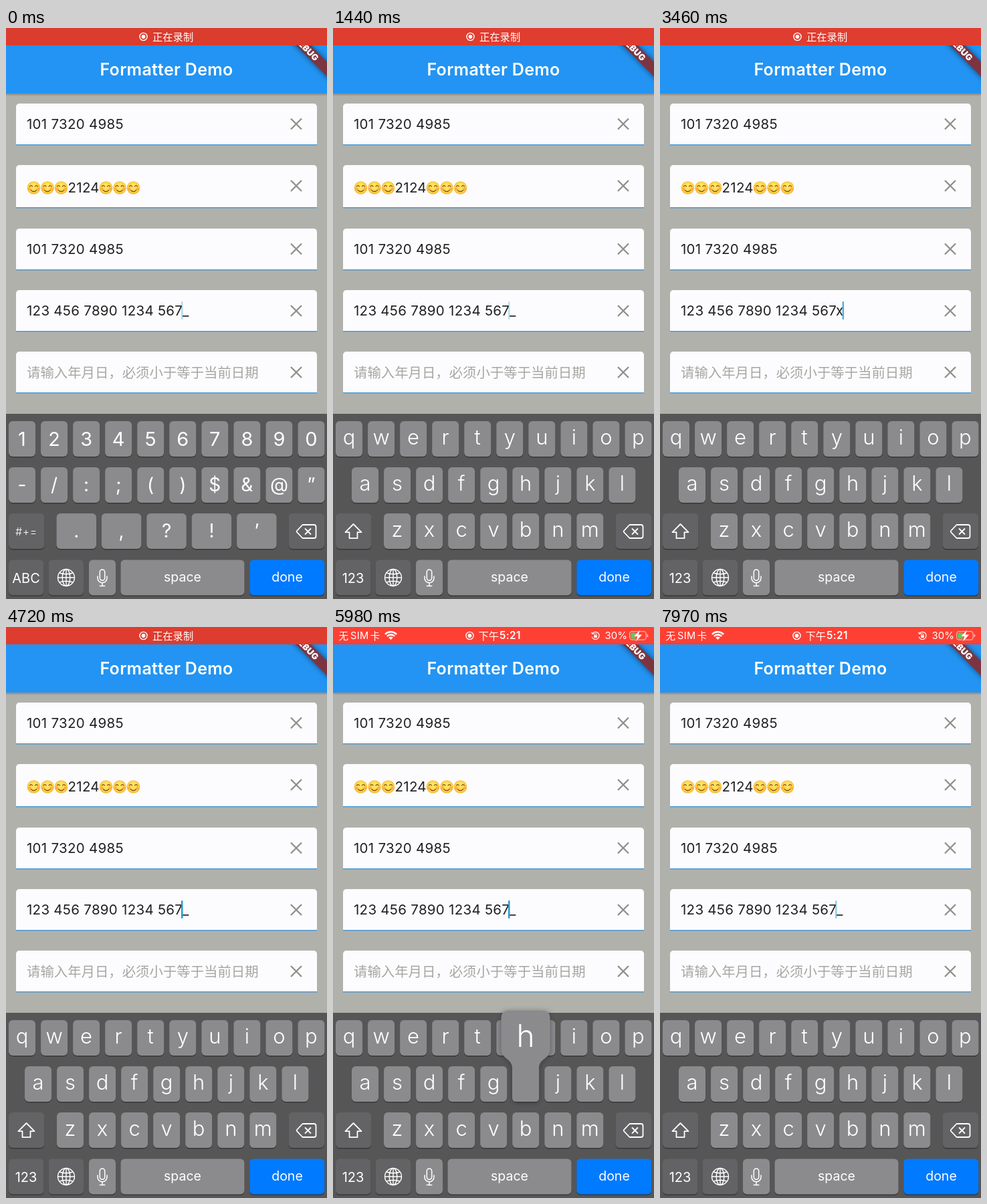
These frames come from a looping animation (480x854 px, 7.99 s). An HTML page with a canvas:

```html
<!DOCTYPE html>
<html lang="zh">
<head>
<meta charset="utf-8">
<title>Formatter Demo</title>
<style>
html, body { margin: 0; width: 100%; height: 100%; overflow: hidden; background: #b1b1ac; }
canvas { display: block; width: 480px; height: 854px; }
</style>
</head>
<body>
<canvas id="stage" width="480" height="854"></canvas>
<script>
const ctx = document.getElementById('stage').getContext('2d');
const TAU = Math.PI * 2;
const LOOP = 7990;
const LATIN = 'Inter, "Noto Sans CJK SC", "Noto Sans CJK", sans-serif';
const CJK = '"Noto Sans CJK SC", "Noto Sans CJK", sans-serif';
const KEY = '#8b8b8e', DARK_KEY = '#636365', BOARD = '#565657', INK = '#202020';

const FIELDS = [
  { top: 113, mid: 143.5, text: '101 7320 4985' },
  { top: 205, mid: 236, h: 63 },
  { top: 300, mid: 330.5, text: '101 7320 4985' },
  { top: 392, mid: 423 },
  { top: 484, mid: 515 }
];

// Times of the events, in ms
const LETTERS_AT = 310, X_AT = 2320, DELETE_AT = 4230, CLOCK_AT = 5300, H_AT = 5900;
const CURSOR_RESETS = [-600, X_AT, DELETE_AT, H_AT];

function text(str, x, y, size, color, { weight = 400, align = 'left', family = LATIN, spacing = 0 } = {}) {
  ctx.font = `${weight} ${size}px ${family}`;
  ctx.letterSpacing = `${spacing}px`;
  ctx.textAlign = align;
  ctx.fillStyle = color;
  ctx.fillText(str, x, y);
}

function fieldText(str, x, y) {
  text(str, x, y, 20.5, INK, { spacing: 0.27 });
}

function box(x, y, w, h, r, color) {
  ctx.beginPath();
  ctx.roundRect(x, y, w, h, r);
  ctx.fillStyle = color;
  ctx.fill();
}

function disc(x, y, r, color) {
  ctx.beginPath();
  ctx.arc(x, y, r, 0, TAU);
  ctx.fillStyle = color;
  ctx.fill();
}

function stroke(path, color, width) {
  ctx.strokeStyle = color;
  ctx.lineWidth = width;
  ctx.stroke(new Path2D(path));
}

function at(x, y, draw) {
  ctx.save();
  ctx.translate(x, y);
  draw();
  ctx.restore();
}

function recordIcon(x) {
  at(x, 13, () => {
    ctx.strokeStyle = '#fff';
    ctx.lineWidth = 1.4;
    ctx.beginPath();
    ctx.arc(0, 0, 5.6, 0, TAU);
    ctx.stroke();
    disc(0, 0, 2.9, '#fff');
  });
}

function wifi() {
  at(86.5, 19, () => {
    ctx.strokeStyle = '#fff';
    ctx.lineWidth = 2.5;
    for (const r of [7.6, 11.7]) {
      ctx.beginPath();
      ctx.arc(0, 0, r, -Math.PI * 0.76, -Math.PI * 0.24);
      ctx.stroke();
    }
    ctx.beginPath();
    ctx.moveTo(0, 0);
    ctx.arc(0, 0, 4.4, -Math.PI * 0.76, -Math.PI * 0.24);
    ctx.fillStyle = '#fff';
    ctx.fill();
  });
}

function battery() {
  ctx.beginPath();
  ctx.roundRect(443.6, 6.6, 24.5, 12.6, 3.6);
  ctx.strokeStyle = 'rgba(255,255,255,.6)';
  ctx.lineWidth = 1.2;
  ctx.stroke();
  box(469.5, 10.6, 1.8, 4.6, [0, 2, 2, 0], 'rgba(255,255,255,.6)');
  box(445.4, 8.4, 8, 9, 2, '#55cf62');
  ctx.fillStyle = '#fff';
  ctx.strokeStyle = '#fd4438';
  ctx.lineWidth = 1;
  const bolt = new Path2D('M459 4.5L450 14H455.3L453 21.5L462.2 11.6H456.8Z');
  ctx.stroke(bolt);
  ctx.fill(bolt);
}

function statusBar(t) {
  const recording = t < CLOCK_AT;
  const glow = recording ? 0.5 - 0.5 * Math.cos(TAU * t / 1630) : 1;
  ctx.fillStyle = `rgb(${218 + 36 * glow},${60 + 4 * glow},${46 + 6 * glow})`;
  ctx.fillRect(0, 0, 480, 26);
  if (recording) {
    recordIcon(205.5);
    text('正在录制', 219, 18.5, 15.3, '#fff', { family: CJK });
    return;
  }
  text('无', 8.5, 18.5, 14.6, '#fff', { family: CJK });
  text('SIM', 26, 18.3, 14.6, '#fff', { spacing: 0.3 });
  text('卡', 55.5, 18.5, 14.6, '#fff', { family: CJK });
  wifi();
  recordIcon(204.5);
  text('下午', 217.5, 18.5, 15.3, '#fff', { family: CJK, weight: 500 });
  text('5:21', 249, 18.4, 15.3, '#fff', { weight: 600, spacing: 0.4 });
  at(392.5, 13, () => {
    stroke('M-4.8 -3A5.6 5.6 0 1 1 -5.4 1.6M-5.8 -5.2L-4.8 -2.6L-2 -3.3', '#fff', 1.2);
    box(-2.4, -0.8, 4.8, 3.8, 0.7, '#fff');
    stroke('M-1.5 -0.6V-1.8A1.5 1.5 0 0 1 1.5 -1.8V-0.6', '#fff', 0.9);
  });
  text('30%', 406.5, 18.3, 15, '#fff');
  battery();
}

function appBar() {
  const shade = ctx.createLinearGradient(0, 98, 0, 102);
  shade.addColorStop(0, 'rgba(60,60,60,.35)');
  shade.addColorStop(1, 'rgba(60,60,60,0)');
  ctx.fillStyle = shade;
  ctx.fillRect(0, 98, 480, 4);
  ctx.fillStyle = '#2394f3';
  ctx.fillRect(0, 26, 480, 72);
  text('Formatter Demo', 240, 70.5, 25, '#fff', { weight: 600, align: 'center', spacing: 0.3 });

  ctx.save();
  ctx.translate(480, 0);
  ctx.rotate(Math.PI / 4);
  ctx.shadowColor = 'rgba(0,0,0,.55)';
  ctx.shadowBlur = 9;
  box(-75, 35.8, 150, 15.4, 0, '#7c3540');
  ctx.shadowColor = 'transparent';
  text('DEBUG', 0, 48.2, 13, '#fff', { weight: 900, align: 'center' });
  ctx.restore();
}

function smiley(x, y) {
  at(x, y, () => {
    const skin = ctx.createRadialGradient(0, -3, 2, 0, 0, 10);
    skin.addColorStop(0, '#ffe664');
    skin.addColorStop(0.75, '#fdd044');
    skin.addColorStop(1, '#f2b032');
    disc(0, 0, 9.8, skin);
    disc(-6.2, 1.8, 2.2, 'rgba(246,130,70,.45)');
    disc(6.2, 1.8, 2.2, 'rgba(246,130,70,.45)');
    stroke('M-6.3 -1.6Q-4 -5 -1.7 -1.6M1.7 -1.6Q4 -5 6.3 -1.6', '#7a4a18', 1.2);
    stroke('M-4.6 3.2Q0 8.2 4.6 3.2', '#7a4a18', 1.2);
  });
}

function cursorAlpha(t) {
  const since = t - CURSOR_RESETS.filter(r => r <= t).pop();
  const phase = since % 1000;
  const k = Math.min(1, (phase % 500) / 250);
  const eased = 1 - (1 - k) ** 2;
  if (phase >= 500) return 1 - eased;
  return since < 500 ? 1 : eased;
}

function fields(t) {
  for (const f of FIELDS) {
    const h = f.h || 61;
    box(15, f.top, 450, h, [5, 5, 0, 0], '#fcfcfe');
    ctx.fillStyle = '#4799d2';
    ctx.fillRect(15, f.top + h, 450, 1.4);
    at(434, f.mid, () => stroke('M-8 -8L8 8M8 -8L-8 8', '#8f8f8a', 2.3));
    if (f.text) fieldText(f.text, 31, f.mid + 7);
  }
  for (let i = 0; i < 3; i++) {
    smiley(41.5 + 20.5 * i, 239);
    smiley(149.5 + 20.5 * i, 239);
  }
  fieldText('2124', 92.5, 246);

  const hasX = t >= X_AT && t < DELETE_AT;
  fieldText('123 456 7890 1234 567', 31, 430);
  fieldText(hasX ? 'x' : '_', hasX ? 263 : 264, 430);
  ctx.globalAlpha = cursorAlpha(t);
  box(hasX ? 272.6 : 262, 409, 2.5, 27, 1, '#2c9ccb');
  ctx.globalAlpha = 1;
  text('请输入年月日，必须小于等于当前日期', 31, 522.5, 20.4, '#a6a6a2', { family: CJK });
}

function key(x, y, w, color = KEY) {
  box(x, y + 1.5, w, 53, 6, '#38383a');
  box(x, y, w, 53, 6, color);
}

function keyRow(chars, x, y, size, base, { step = 48.05, w = 40, weight = 300 } = {}) {
  [...chars].forEach((c, i) => {
    const left = x + i * step;
    key(left, y, w);
    text(c, left + w / 2, y + base, size, '#fff', { weight, align: 'center' });
  });
}

function bottomRow(label) {
  key(4, 795.5, 52.5, DARK_KEY);
  text(label, 30, 829.5, 20, '#fff', { align: 'center' });
  key(63.5, 795.5, 52.5, DARK_KEY);
  at(90, 822, () => {
    ctx.strokeStyle = '#fff';
    ctx.lineWidth = 1.4;
    for (const rx of [12.5, 5.8]) {
      ctx.beginPath();
      ctx.ellipse(0, 0, rx, 12.5, 0, 0, TAU);
      ctx.stroke();
    }
    stroke('M-12.5 0H12.5M0 -12.5V12.5M-10 -7Q0 -3.4 10 -7M-10 7Q0 3.4 10 7', '#fff', 1.4);
  });
  key(124, 795.5, 40);
  at(144, 822, () => {
    stroke('M-3.7 -8.4A3.7 3.7 0 0 1 3.7 -8.4V0.6A3.7 3.7 0 0 1 -3.7 0.6Z', '#fff', 1.5);
    stroke('M-7 -2.5V0.8A7 7 0 0 0 7 0.8V-2.5M0 8V12.2M-4.3 12.4H4.3', '#fff', 1.5);
  });
  key(171.5, 795.5, 185);
  text('space', 264, 828, 19.5, '#fff', { align: 'center' });
  key(364.3, 795.5, 112, '#007aff');
  text('done', 420.5, 828, 19.5, '#fff', { align: 'center' });
}

function keyboard(letters) {
  ctx.fillStyle = BOARD;
  ctx.fillRect(0, 577, 480, 277);
  key(4, 726, 53.5, DARK_KEY);
  key(422.5, 726, 53.5, DARK_KEY);
  if (letters) {
    keyRow('qwertyuiop', 4, 588, 31, 34.5);
    keyRow('asdfghjkl', 28, 657, 31, 34.5);
    keyRow('zxcvbnm', 76, 726, 31, 34.5);
    at(30.5, 753, () =>
      stroke('M0 -11L12 1.2H6V10.2H-6V1.2H-12Z', '#fff', 1.8));
  } else {
    keyRow('1234567890', 4, 588, 29, 37, { weight: 400 });
    keyRow('-/:;()$&@”', 4, 657, 28, 35.5, { weight: 400 });
    keyRow('.,?!’', 75.5, 726, 28, 36, { step: 67.4, w: 59.5, weight: 400 });
    text('#+=', 30.5, 758.5, 16, '#fff', { align: 'center', weight: 300, spacing: 0.6 });
  }
  at(449, 753, () => {
    stroke('M-5.5 -10H11.5Q14.5 -10 14.5 -7V7Q14.5 10 11.5 10H-5.5L-14 1Q-14.8 0 -14 -1Z', '#fff', 1.8);
    stroke('M-2 -4.5L7 4.5M7 -4.5L-2 4.5', '#fff', 1.8);
  });
  bottomRow(letters ? '123' : 'ABC');
}

// Enlarged bubble that grows out of a pressed key
function popup(char, mid, top) {
  at(mid, top, () => {
    ctx.shadowColor = 'rgba(35,35,45,.5)';
    ctx.shadowBlur = 8;
    ctx.shadowOffsetY = 1;
    ctx.fillStyle = KEY;
    ctx.fill(new Path2D(
      'M-25.5 -83H25.5Q36.5 -83 36.5 -72V-25C36.5 -11 20 -12 20 3' +
      'V47Q20 53 14 53H-14Q-20 53 -20 47V3C-20 -12 -36.5 -11 -36.5 -25V-72Q-36.5 -83 -25.5 -83Z'));
    ctx.shadowColor = 'transparent';
    text(char, 0, -29.5, 46, '#fff', { weight: 300, align: 'center' });
  });
}

function draw(t) {
  ctx.lineJoin = 'round';
  ctx.fillStyle = '#b1b1ac';
  ctx.fillRect(0, 0, 480, 854);
  appBar();
  statusBar(t);
  fields(t);
  keyboard(t >= LETTERS_AT);
  if (t >= X_AT - 60 && t < X_AT + 180) popup('x', 144, 726);
  if (t >= H_AT - 40 && t < H_AT + 180) popup('h', 288, 657);
}

const start = performance.now();
function frame() {
  draw((performance.now() - start) % LOOP);
  requestAnimationFrame(frame);
}
frame();
</script>
</body>
</html>
```
